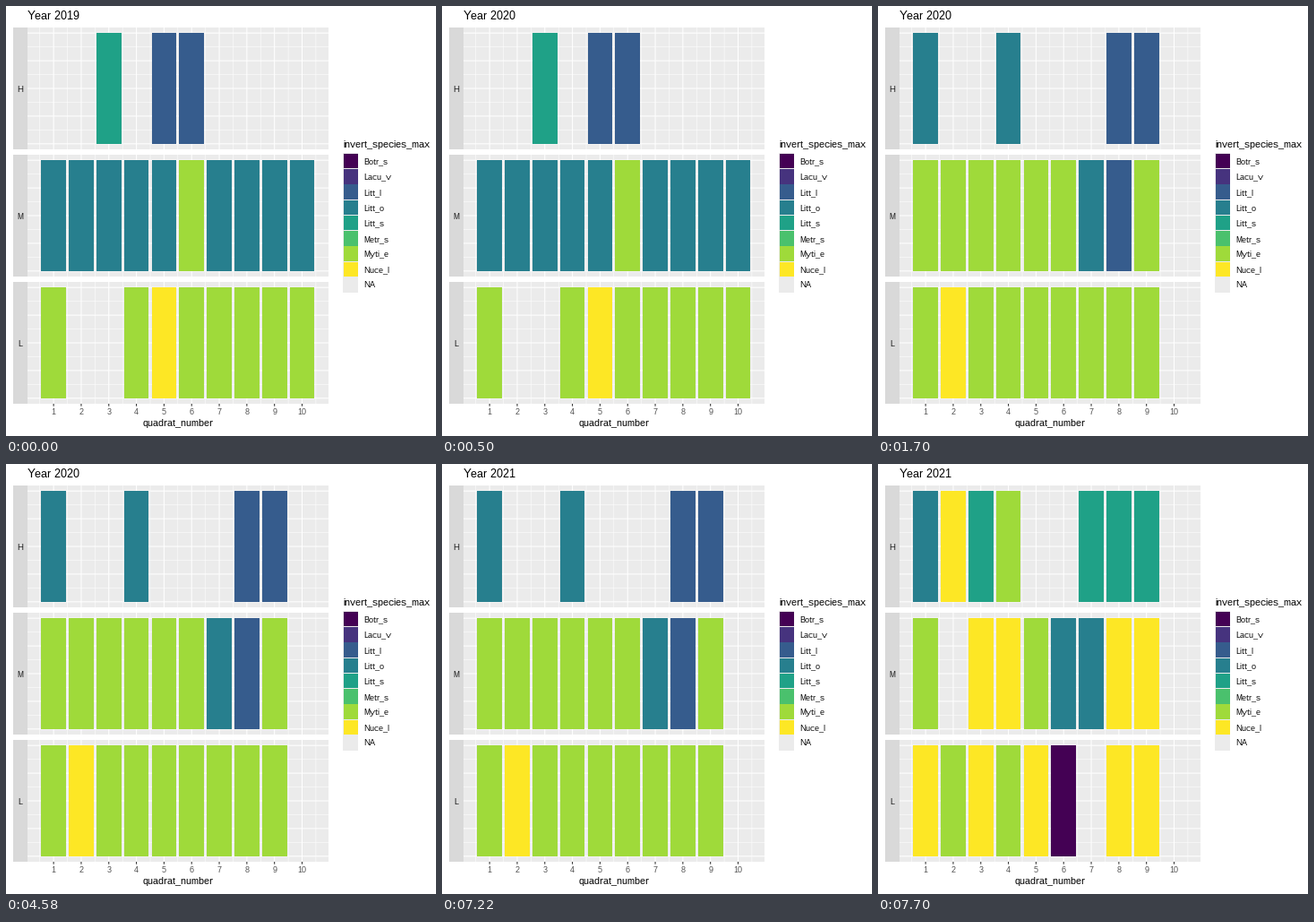
These frames come from a looping animation (480 by 480 pixels, 8 s). A matplotlib script:

```python
import matplotlib.pyplot as plt
from matplotlib.animation import FuncAnimation
from matplotlib.patches import Rectangle

SIZE, DPI = 480, 100
INTERVAL, FRAMES = 100, 80

plt.rcParams["font.family"] = "Liberation Sans"
plt.rcParams["text.hinting"] = "native"
plt.rcParams["text.hinting_factor"] = 1

SPECIES = ["Botr_s", "Lacu_v", "Litt_l", "Litt_o", "Litt_s", "Metr_s", "Myti_e", "Nuce_l"]
COLORS = ["#440154", "#46337E", "#365C8D", "#277F8E",
          "#1FA187", "#4AC16D", "#9FDA3A", "#FDE725"]
GREY, STRIP = "#EBEBEB", "#D9D9D9"

# One digit per quadrat gives the species index; a dot is an empty quadrat.
SURVEYS = {
    2019: ("..4.22....", "3333363333", "6..6766666"),
    2020: ("3..3...22.", "666666326.", "676666666."),
    2021: ("3746..444.", "6.7763377.", "767670.77."),
}
LEVELS = "HML"

LEFT, STEP, RIGHT = 24, 30.82, 360
TOP, HEIGHT, PITCH = 24, 136, 142
KEY_X, KEY_Y, KEY = 376.2, 164.4, 17.28

fig = plt.figure(figsize=(SIZE / DPI, SIZE / DPI), dpi=DPI, facecolor="white")
ax = fig.add_axes([0, 0, 1, 1])
ax.set(xlim=(0, SIZE), ylim=(SIZE, 0))
ax.axis("off")


def px(value):
    return value * 72 / DPI


def rect(x0, y0, x1, y1, color, z=1):
    x0, y0, x1, y1 = (round(v) for v in (x0, y0, x1, y1))
    patch = Rectangle((x0, y0), x1 - x0, y1 - y0, facecolor=color,
                      linewidth=0, antialiased=False, zorder=z)
    return ax.add_patch(patch)


def line(xs, ys, width, color="white", z=2):
    ax.plot(xs, ys, color=color, lw=px(width), solid_capstyle="butt",
            snap=False, zorder=z)


def text(x, y, label, size, color="black", ha="left"):
    return ax.text(x, y, label, fontsize=px(size), color=color, ha=ha,
                   va="baseline", zorder=5)


def x_pos(quadrat):
    return LEFT + (quadrat - 0.055) * STEP


def draw_panel(row):
    top = TOP + row * PITCH
    bottom = top + HEIGHT
    rect(8, top, LEFT, bottom, STRIP)
    rect(LEFT, top, RIGHT, bottom, GREY)
    text(16, top + 72, LEVELS[row], 8.8, "#1A1A1A", "center")

    def y_line(i, width):
        y = bottom - HEIGHT * (0.05 + i / 8) / 1.1
        line([LEFT, RIGHT], [y, y], width)

    def x_line(q, width):
        line([x_pos(q)] * 2, [top, bottom], width)

    for i in range(1, 8, 2):
        y_line(i, 0.53)
    for q in range(11):
        x_line(q + 0.5, 0.53)
    for i in range(0, 9, 2):
        y_line(i, 1.07)
    for q in range(1, 11):
        x_line(q, 1.07)


def draw_axis():
    bottom = TOP + 2 * PITCH + HEIGHT
    for q in range(1, 11):
        x = x_pos(q)
        line([x, x], [bottom, bottom + 2.74], 1.07, "#333333")
        text(x, 456, str(q), 8.8, "#4D4D4D", "center")
    text(192, 469, "quadrat_number", 11, ha="center")


def draw_legend():
    text(376, 158, "invert_species_max", 11)
    rect(KEY_X, KEY_Y, KEY_X + KEY, KEY_Y + 9 * KEY, GREY)
    for i, label in enumerate(SPECIES + ["NA"]):
        y = KEY_Y + i * KEY
        if i < len(COLORS):
            rect(KEY_X + 0.4, y + 0.4, KEY_X + KEY - 0.5, y + KEY - 0.4, COLORS[i], 3)
        text(399, round(y + 11.8), label, 8.8)


def draw_survey(rows):
    bars = []
    for row, codes in enumerate(rows):
        top = TOP + row * PITCH
        for q, code in enumerate(codes, 1):
            if code != ".":
                bars.append(rect(x_pos(q - 0.45), top + 6, x_pos(q + 0.45),
                                 top + 130, COLORS[int(code)], 3))
    return bars


for row in range(3):
    draw_panel(row)
draw_axis()
draw_legend()
title = text(24, 15, "Year 2019", 13.2)
surveys = {year: draw_survey(rows) for year, rows in SURVEYS.items()}


def year_at(t, first, second):
    return 2019 + (t >= first) + (t >= second)


def update(frame):
    t = frame * INTERVAL
    title.set_text(f"Year {year_at(t, 500, 6500)}")
    shown = year_at(t, 1700, 7700)
    for year, bars in surveys.items():
        for bar in bars:
            bar.set_visible(year == shown)
    return [title]


anim = FuncAnimation(fig, update, frames=FRAMES, interval=INTERVAL,
                     repeat=True, repeat_delay=0, blit=False)
plt.show()
```
